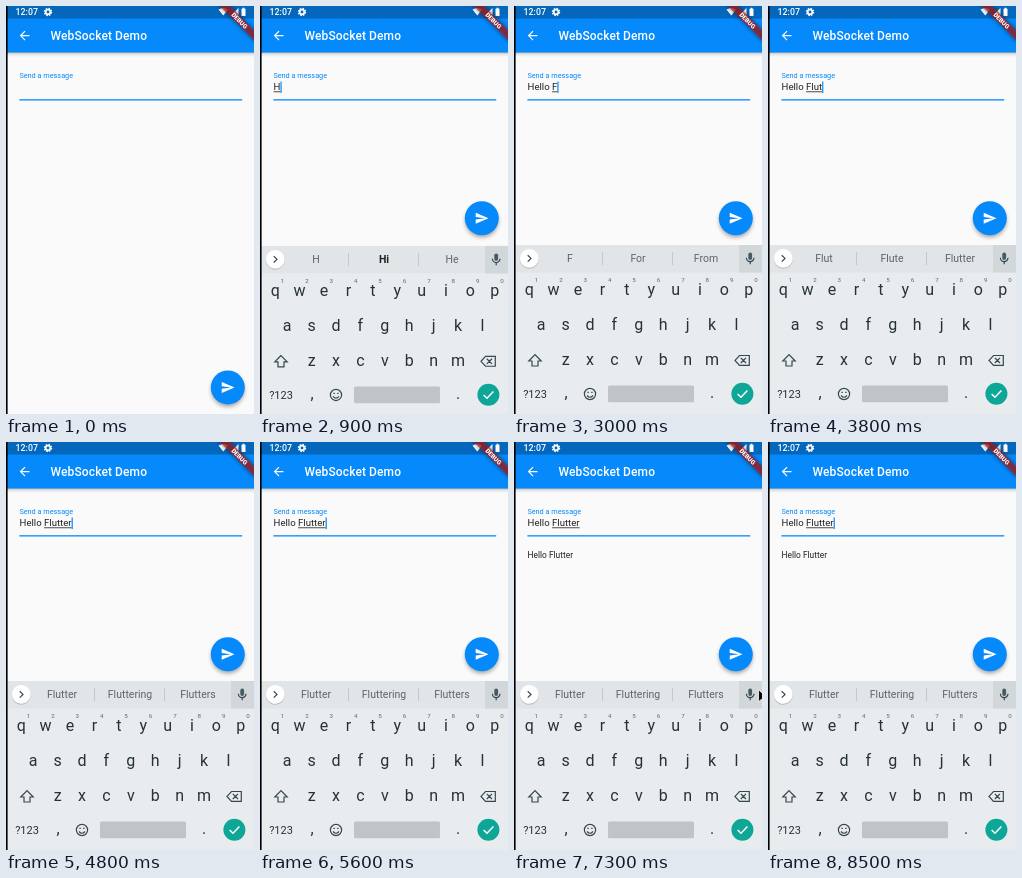
Recreate the animation shown at these times as an HTML page. Size 248 by 408 pixels, loop 8600 ms.

```html
<!DOCTYPE html>
<html lang="en">
<head>
<meta charset="utf-8">
<title>WebSocket Demo</title>
<style>
  html, body { margin: 0; width: 100%; height: 100%; overflow: hidden; background: #fafafa; }
  svg { display: block; width: 248px; height: 408px; font-family: Roboto, sans-serif; }
  text { white-space: pre; }
  .mid { text-anchor: middle; }
  .white { fill: #fff; }
  .ink { fill: #212121; }
  .key { fill: #263238; font-size: 16px; }
  .hint { fill: #5c686e; font-size: 6.2px; }
  .word { fill: #5c666b; font-size: 10.5px; }
  .line { fill: none; stroke: #37474f; stroke-width: 1.2; }
</style>
</head>
<body>
<svg viewBox="0 0 248 408">
  <defs>
    <linearGradient id="fade" x2="0" y2="1">
      <stop stop-color="#000" stop-opacity=".3"/>
      <stop offset=".4" stop-color="#000" stop-opacity=".1"/>
      <stop offset="1" stop-color="#000" stop-opacity="0"/>
    </linearGradient>
    <filter id="soft" x="-30%" y="-80%" width="160%" height="260%"><feGaussianBlur stdDeviation="2"/></filter>
    <clipPath id="disc"><circle r="17"/></clipPath>
  </defs>

  <rect width="248" height="408" fill="#fafafa"/>

  <!-- text field and reply -->
  <text x="13.4" y="72.2" font-size="7.3" fill="#0589fb">Send a message</text>
  <text class="ink" x="13.6" y="84.2" font-size="9.6"><tspan id="done"></tspan><tspan id="draft"></tspan></text>
  <rect id="under" y="85.4" height=".8" fill="#212121"/>
  <rect id="caret" y="75.5" width="1.2" height="11.5" fill="#0589fb"/>
  <rect x="13.4" y="93.2" width="222.8" height="1.3" fill="#0589fb"/>
  <text id="reply" class="ink" x="13.6" y="116" font-size="8.4">Hello Flutter</text>

  <!-- app bar -->
  <rect y="46" width="248" height="5" fill="url(#fade)"/>
  <rect width="248" height="46.5" fill="#0589fb"/>
  <rect width="248" height="12.5" fill="#0467bc"/>
  <text class="white" x="9.6" y="9.3" font-size="8.8" font-weight="500">12:07</text>
  <circle cx="42" cy="6" r="2.3" fill="none" stroke="#fff" stroke-width="1.7"/>
  <circle cx="42" cy="6" r="3.6" fill="none" stroke="#fff" stroke-width="1.2" stroke-dasharray="1.6 1.23"/>
  <path class="white" d="M212.5 3.6Q217.3 .4 222 3.6L217.3 9.5ZM225 9.5L232.5 2V9.5ZM235.5 2.7H236.6V1.8H238.4V2.7H239.5V10H235.5Z"/>
  <path class="white" transform="translate(11.3 22.3) scale(.61)" d="M20 11H7.8l5.6-5.6L12 4l-8 8 8 8 1.4-1.4L7.8 13H20z"/>
  <text class="white" x="44.6" y="34.2" font-size="12" font-weight="500" letter-spacing=".1">WebSocket Demo</text>
  <g transform="translate(248 0) rotate(45)">
    <rect x="-26" y="17" width="52" height="7.2" fill="#000" opacity=".5" filter="url(#soft)"/>
    <rect x="-26" y="17" width="52" height="7.2" fill="#b71c1c" opacity=".66"/>
    <text class="white mid" y="22.8" font-size="6.2" font-weight="900">DEBUG</text>
  </g>

  <g id="keys"></g>

  <!-- send button -->
  <g id="fab">
    <circle cy="2.6" r="16.5" opacity=".36" filter="url(#soft)"/>
    <circle r="17" fill="#0589fb"/>
    <circle id="ripple" class="white" clip-path="url(#disc)"/>
    <path class="white" transform="translate(-7.3 -7.3) scale(.61)" d="M2 21L23 12 2 3v7l15 2-15 2z"/>
  </g>
  <path id="mouse" d="M0 0V12.2L2.9 9.6 4.8 13.8 6.8 12.9 4.9 8.8H8.7Z" stroke="#fff" stroke-width=".8"/>
  <rect width="1.6" height="408"/>
</svg>

<script>
const LOOP = 8600;
const KEYS_AT = 720, KEYS_MS = 220, FAB_AT = 800;
const SENT_AT = 6500, REPLY_AT = 6800;

// time, finished text, word being typed, suggestions
const steps = [
  [500, "", "", ""],
  [840, "", "H", "H|Hi|He"],
  [1200, "", "He", "He|Hey|Hello"],
  [1450, "", "Hel", "Hel|Hello|Help"],
  [1650, "", "Hell", "Hell|Hello|Hells"],
  [1900, "", "Hello", "Hello|Hello I|Helo"],
  [2350, "Hello ", "", "I|how|there"],
  [2850, "Hello ", "F", "F|For|From"],
  [3150, "Hello ", "Fl", "Fl|Flow|Fly"],
  [3400, "Hello ", "Flu", "Flu|Flute|Flush"],
  [3650, "Hello ", "Flut", "Flut|Flute|Flutter"],
  [3950, "Hello ", "Flutt", "Flutt|Flutter|Flute"],
  [4200, "Hello ", "Flutte", "Flutte|Flutter|Fluttered"],
  [4400, "Hello ", "Flutter", "Flutter|Fluttering|Flutters"]
];

// time, x, y of the pointer tip
const track = [[5500, 252, 262], [6100, 223, 206], [6900, 223, 206], [7500, 252, 262]];

const $ = id => document.getElementById(id);
const place = (el, x, y) => el.setAttribute("transform", `translate(${x} ${y})`);
const show = (el, on) => el.setAttribute("visibility", on ? "visible" : "hidden");
const text = (s, x, y, cls, more = "") => `<text class="mid ${cls}" x="${x}" y="${y}" ${more}>${s}</text>`;
const letters = (s, x, y, cls) => [...s].map((c, i) => text(c, x + i * 24.4, y, cls)).join("");

$("keys").innerHTML =
  `<rect y="239" width="248" height="172" fill="#e8ecef"/>
   <rect y="239" width="248" height="27.5" fill="#e1e5e8"/>
   <rect x="225" y="239" width="23" height="27.5" fill="#d2d7da"/>
   <path d="M88.5 246V259M158.5 246V259" stroke="#c3c8cb"/>
   <circle cx="15.3" cy="253.2" r="9.5" opacity=".18"/>
   <circle class="white" cx="15.3" cy="252.4" r="9.4"/>
   <path class="line" d="M13.7 249.2L17 252.4 13.7 255.6"/>
   <rect x="234.3" y="246.5" width="3.8" height="7.4" rx="1.9" fill="#455a64"/>
   <path class="line" d="M232.4 251.8A3.8 3.8 0 0 0 240 251.8M236.2 255.6V258.2"/>` +
  [56, 124, 192].map(x => text("", x, 256.3, "word")).join("") +
  letters("qwertyuiop", 15.2, 288.8, "key") +
  letters("1234567890", 22.5, 276, "hint") +
  letters("asdfghjkl", 27.2, 323.6, "key") +
  letters("zxcvbnm", 51.6, 359, "key") +
  text("?123", 21, 392, "key", 'style="font-size:11px"') +
  text(",", 52, 392, "key") + text(".", 198, 392, "key") +
  `<path class="line" d="M21 348.6L14.8 355H18V360H24V355H27.2Z"/>
   <path class="line" d="M225.5 349.5H235.3V359.3H225.5L221 354.4ZM226.8 351.8L232 357M232 351.8L226.8 357"/>
   <circle class="line" cx="76" cy="388" r="5.6"/>
   <path class="line" d="M73 389.5Q76 393 79 389.5M73.4 386.4H74.8M77.2 386.4H78.6"/>
   <rect x="94" y="379.6" width="86" height="16.6" rx="1.5" fill="#bfc4c7"/>
   <circle cx="228.4" cy="387.8" r="11" fill="#0ea697"/>
   <path d="M223.6 388L227 391.3 233.4 384.6" fill="none" stroke="#fff" stroke-width="1.5"/>`;

const words = [...document.querySelectorAll(".word")];
const ease = p => p * p * (3 - 2 * p);

function pointer(t) {
  const i = track.findIndex(k => k[0] > t);
  if (i < 1) return null;
  const [a, b] = [track[i - 1], track[i]];
  const p = ease((t - a[0]) / (b[0] - a[0]));
  return [a[1] + (b[1] - a[1]) * p, a[2] + (b[2] - a[2]) * p];
}

function drawField(t) {
  const [since, done, draft, hints] = steps.filter(s => s[0] <= t).pop() || [Infinity, "", "", ""];
  $("done").textContent = done;
  $("draft").textContent = draft;
  const start = 13.6 + (done ? $("done").getComputedTextLength() : 0);
  const width = draft ? $("draft").getComputedTextLength() : 0;
  $("under").setAttribute("x", start);
  $("under").setAttribute("width", width);
  $("caret").setAttribute("x", start + width);
  show($("caret"), t >= since && (t - since) % 1000 < 500);
  const list = hints.split("|");
  words.forEach((el, i) => {
    const bold = draft === "H" && i === 1;
    el.textContent = list[i] || "";
    el.style.fontWeight = bold ? 700 : 400;
    el.style.fill = bold ? "#212121" : "";
  });
}

function draw(t) {
  drawField(t);
  const left = 1 - Math.min(1, Math.max(0, (t - KEYS_AT) / KEYS_MS));
  place($("keys"), 0, 169 * left ** 3);
  show($("keys"), t >= KEYS_AT);
  place($("fab"), 221.8, t < FAB_AT ? 381.4 : 212.2);
  const p = (t - SENT_AT) / 400, on = p > 0 && p < 1;
  $("ripple").setAttribute("r", on ? 4 + 16 * p : 0);
  $("ripple").setAttribute("opacity", on ? .25 * (1 - p) : 0);
  show($("reply"), t >= REPLY_AT);
  const at = pointer(t);
  show($("mouse"), at);
  if (at) place($("mouse"), ...at);
}

const begin = performance.now();
function tick() {
  draw((performance.now() - begin) % LOOP);
  requestAnimationFrame(tick);
}
tick();
</script>
</body>
</html>
```
